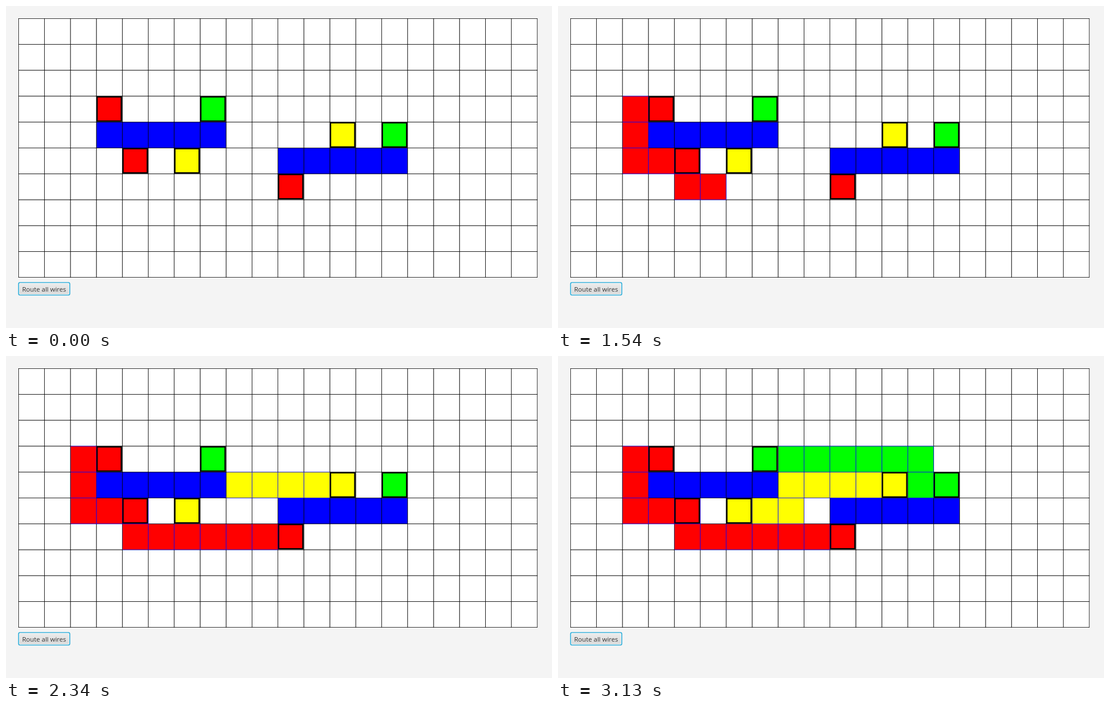
An HTML page with a canvas that plays this animation: 973x575 px, repeating every 4.04 s.

```html
<!DOCTYPE html>
<html lang="en">
<head>
<meta charset="utf-8">
<title>Wire routing</title>
<style>
  html, body { margin: 0; width: 100%; height: 100%; overflow: hidden; background: #f4f4f4; }
  canvas, svg { position: absolute; left: 0; top: 0; display: block; }
  text { font: 11.55px "Open Sans", "Noto Sans", sans-serif; fill: #333; }
</style>
</head>
<body>
<canvas id="board" width="973" height="575"></canvas>
<svg width="973" height="575">
  <defs>
    <linearGradient id="body" x1="0" y1="0" x2="0" y2="1">
      <stop offset="0" stop-color="#ececec"/>
      <stop offset="1" stop-color="#d9d9d9"/>
    </linearGradient>
  </defs>
  <rect x="21" y="492.4" width="94" height="25.2" rx="4" fill="#039ed3" fill-opacity=".13"/>
  <rect x="21.8" y="493.2" width="92.5" height="23.6" rx="3" fill="#1fa8d6"/>
  <rect x="23.2" y="494.6" width="89.7" height="20.8" rx="2" fill="#fafafa"/>
  <rect x="24" y="495.4" width="88.1" height="19.2" rx="1.5" fill="url(#body)"/>
  <text x="67.9" y="509.6" text-anchor="middle">Route all wires</text>
</svg>
<script>
const LOOP = 4040, STEP = 78;
const COLS = 20, ROWS = 10, ORIGIN = 22.4, SIZE = 46.22;
const ctx = document.getElementById('board').getContext('2d');

const blocks = [{ col: 3, row: 4 }, { col: 10, row: 5 }];
const BLOCK_LENGTH = 5;

// Moves: U, D, L, R take one step each, lower case takes none, a dot waits one step
const wires = [
  { color: '#f00', start: 1070, from: [2, 3], moves: '.DDRrDR.RRRR', pins: [[3, 3], [4, 5], [10, 6]] },
  { color: '#ff0', start: 2010, from: [11, 4], moves: '.Ll.LDL', pins: [[6, 5], [12, 4]] },
  { color: '#0f0', start: 2662, from: [13, 4], moves: 'ULLLLL', pins: [[7, 3], [14, 4]] }
];
const directions = { U: [0, -1], D: [0, 1], L: [-1, 0], R: [1, 0], '.': [0, 0] };

function trace({ color, start, from, moves }) {
  let [col, row] = from;
  let time = start;
  const cells = [{ time, col, row, color }];
  for (const move of moves) {
    const [dx, dy] = directions[move.toUpperCase()];
    col += dx;
    row += dy;
    if (move === move.toUpperCase()) time += STEP;
    if (move !== '.') cells.push({ time, col, row, color });
  }
  return cells;
}
const route = wires.flatMap(trace);

// Painted right to left, outer rows first, so shared edges overlap inwards
const cells = Array.from({ length: COLS * ROWS }, (_, i) =>
  ({ col: COLS - 1 - i % COLS, row: Math.floor(i / COLS) }));
cells.sort((a, b) => Math.abs(b.row - 4) - Math.abs(a.row - 4));

const at = index => ORIGIN + index * SIZE;
const isBlock = (col, row) => blocks.some(b =>
  row === b.row && col >= b.col && col < b.col + BLOCK_LENGTH);

function box(x, y, size, fill, stroke, width) {
  ctx.fillStyle = fill;
  ctx.strokeStyle = stroke;
  ctx.lineWidth = width;
  ctx.fillRect(x, y, size, size);
  ctx.strokeRect(x, y, size, size);
}

function draw(count) {
  ctx.clearRect(0, 0, 973, 575);
  const laid = route.slice(0, count);
  for (const { col, row } of cells) {
    const wire = laid.find(c => c.col === col && c.row === row);
    const fill = wire ? wire.color : isBlock(col, row) ? '#00f' : '#fff';
    box(at(col), at(row), SIZE, fill, wire ? '#00f' : '#000', 0.8);
  }
  for (const { color, pins } of wires) {
    for (const [col, row] of pins) {
      box(at(col) + 1.2, at(row) + 1.2, SIZE - 2.9, color, '#000', 2.4);
    }
  }
}

let shown = -1;
function tick() {
  const time = performance.now() % LOOP;
  const count = route.filter(c => c.time <= time).length;
  if (count !== shown) draw(shown = count);
  requestAnimationFrame(tick);
}
tick();
</script>
</body>
</html>
```
